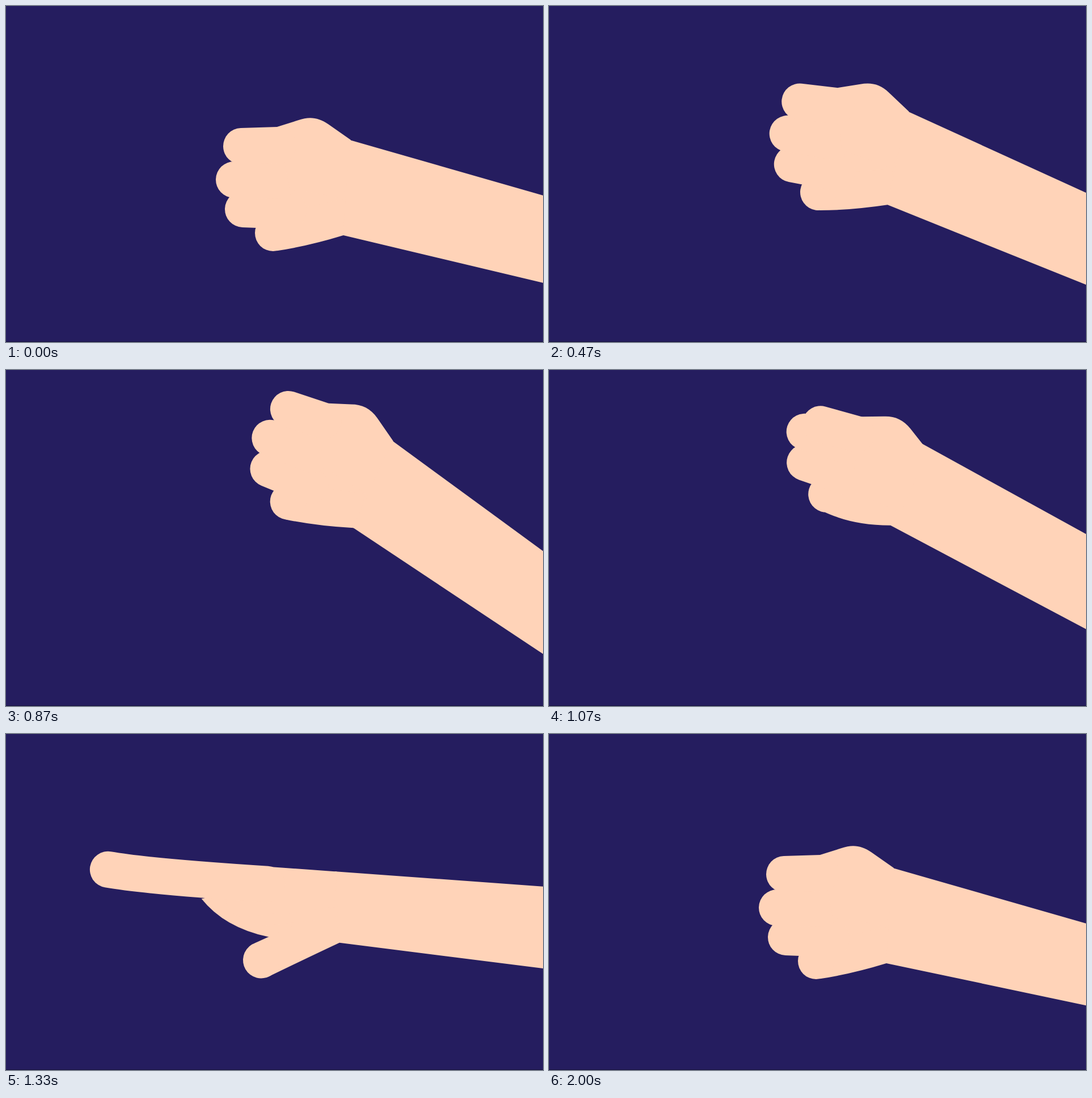
Recreate the animation shown at these times as an HTML page. Size 947 px wide and 592 px high, loop 2280 ms.

```html
<!DOCTYPE html>
<html lang="en">
<head>
<meta charset="utf-8">
<title>Hand</title>
<style>
  html, body { margin: 0; width: 100%; height: 100%; overflow: hidden; background: #251d5f; }
  svg { display: block; width: 947px; height: 592px; }
  g { fill: #ffd3b8; }
  .finger { fill: none; stroke: #ffd3b8; stroke-width: 64; stroke-linecap: round; }
</style>
</head>
<body>
<svg viewBox="0 0 947 592">
  <rect width="947" height="592" fill="#251d5f"/>
  <g id="front">
    <path id="arm"/>
    <path id="palm"/>
    <path id="thumb"/>
    <path id="thumbTip" class="finger"/>
    <path id="ring" class="finger"/>
    <path id="middle" class="finger"/>
  </g>
  <g id="back">
    <path id="knuckle"/>
    <path id="index" class="finger"/>
  </g>
  <rect y="591" width="947" height="1" fill="#17123c"/>
</svg>
<script>
const LOOP = 2280, FRAME = 1000 / 30;
const ELBOW = [957, 391];
const WRIST_TOP = 606, WRIST_BOTTOM = 595, ARM_LENGTH = 620;

const mix = (a, b, k) => a + (b - a) * k;
const slope = deg => Math.tan(deg * Math.PI / 180);
const el = id => document.getElementById(id);
const draw = (id, d) => el(id).setAttribute('d', d);

const smooth = p => (1 - Math.cos(Math.PI * p)) / 2;
const rise = p => 0.65 * smooth(p) + 0.35 * (1 - (1 - p) ** 2);
const speedUp = p => p * p;
const slowDown = p => Math.sin(p * Math.PI / 2);
const settle = p => 1 - (1 - p) ** 6;

// top and bottom are the heights of the arm's edges at the wrist.
const fist = { open: 0, lift: 0, top: 236, bottom: 404, topAngle: 16, bottomAngle: 13.4 };
const rest = { ...fist, bottomAngle: 11.9 };
const windup = { open: 0, lift: -40, top: 266, bottom: 420, topAngle: 12, bottomAngle: 11.1 };
const point = { open: 1, lift: 0, top: 191, bottom: 316, topAngle: 12.2, bottomAngle: 15.3 };

// Each ease leads from the previous key to its own key.
const key = (t, swing, pose, ease) => ({ t, ease, state: { ...pose, swing } });
const keys = [
  key(0, 0, fist),
  key(117, -7.2, fist, smooth),
  key(517, 9, fist, rise),
  key(596, -9.2, fist, smooth),
  key(967, 24.8, fist, rise),
  key(1066, 17, windup, speedUp),
  key(1230, -12.3, point, slowDown),
  key(1600, -7.4, point, settle),
  key(1733, -7.4, point, smooth),
  key(2000, 0, rest, smooth),
  key(LOOP, 0, rest, smooth)
];

function stateAt(t) {
  const n = Math.max(1, keys.findIndex(k => k.t > t));
  const from = keys[n - 1], to = keys[n];
  const k = to.ease((t - from.t) / (to.t - from.t));
  return Object.fromEntries(Object.keys(from.state).map(
    name => [name, mix(from.state[name], to.state[name], k)]));
}

function drawHand({ open, lift, swing, top, bottom, topAngle, bottomAngle }) {
  const between = (closed, opened) => closed.map((v, i) => mix(v, opened[i], open));
  const topEdge = x => top + (x - WRIST_TOP) * slope(topAngle);
  const bump = (x, y) => [x, mix(y, topEdge(x), open)];

  const wristTop = [WRIST_TOP, top], wristBottom = [WRIST_BOTTOM, bottom];
  const heel = [WRIST_BOTTOM, bottom - 64];
  const core = [500, (top + bottom) / 2];
  const farTop = [WRIST_TOP + ARM_LENGTH, topEdge(WRIST_TOP + ARM_LENGTH)];
  const farBottom = [WRIST_BOTTOM + ARM_LENGTH, bottom + ARM_LENGTH * slope(bottomAngle)];
  draw('arm', `M${wristTop}L${farTop}L${farBottom}L${wristBottom}L${core}Z`);

  const palmStart = between([410, 274], [365, 205]);
  const palmBend = between([386, 320], [398, 261]);
  const palmEnd = between([440, 388], [472, 288]);
  draw('palm', `M${palmStart}Q${palmBend} ${palmEnd}L${WRIST_BOTTOM},${bottom - 10}L${wristTop}Z`);

  const [tx, ty] = between([471, 400], [454, 327]);
  draw('thumbTip', `M${tx},${ty}h0.01`);
  draw('thumb', `M${tx - 7},${ty - 31.2}L${tx + 7},${ty + 31.2}` +
    `Q533,${bottom + 19} ${wristBottom}L${heel}Z`);

  draw('middle', `M${between([402, 306], [439, 216])}l80,2`);
  draw('ring', `M${between([418, 358], [472, 236])}l80,3`);

  draw('knuckle', `M${bump(478, 213)}L${bump(516, 201)}` +
    `C${bump(534, 194.5)} ${bump(551, 195.8)} ${bump(568, 208)}` +
    `L${bump(608, 236)}L${heel}L${core}Z`);
  draw('index', `M${between([415, 247], [209, 131])}` +
    `Q${between([447, 246], [277, 153])} ${between([480, 245], [483, 196])}`);

  const rotation = `rotate(${swing} ${ELBOW})`;
  el('back').setAttribute('transform', rotation);
  el('front').setAttribute('transform', `translate(0 ${lift}) ${rotation}`);
}

const start = performance.now();
function tick() {
  const ms = (performance.now() - start) % LOOP;
  drawHand(stateAt(Math.floor((ms + 5) / FRAME) * FRAME));
  requestAnimationFrame(tick);
}
tick();
</script>
</body>
</html>
```
